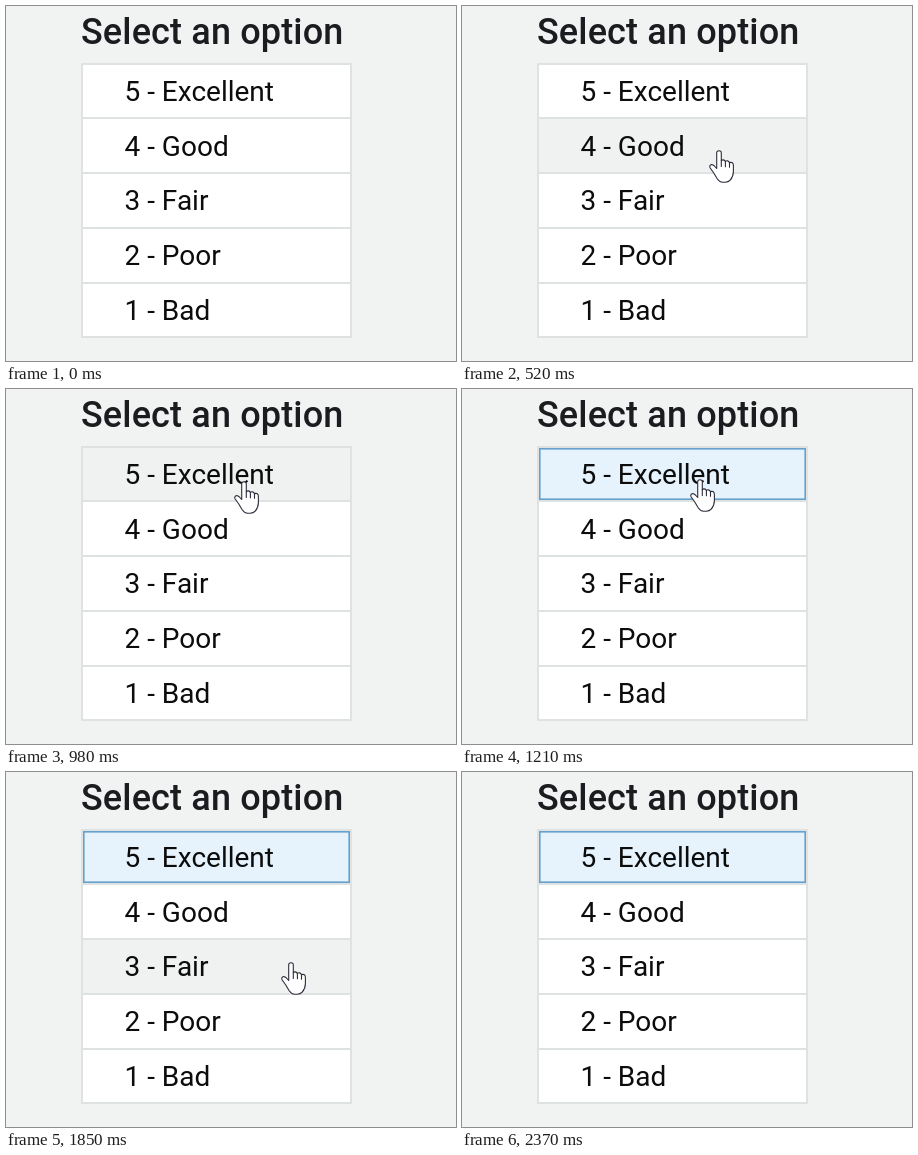
Animation, 450 px wide and 355 px high, one loop 2.99 s. Source, as an HTML page with a canvas:

```html
<!DOCTYPE html>
<html lang="en">
<head>
<meta charset="utf-8">
<title>Select an option</title>
<style>
  html, body { margin: 0; width: 100%; height: 100%; overflow: hidden; background: #f1f3f3; }
  canvas { display: block; }
</style>
</head>
<body>
<canvas id="stage" width="450" height="355"></canvas>
<script>
const ctx = document.getElementById('stage').getContext('2d');
const LOOP = 2990, SELECT_AT = 1210;
const LEFT = 76, RIGHT = 345, TOP = 57.7, PITCH = 54.75;
const options = ['5 - Excellent', '4 - Good', '3 - Fair', '2 - Poor', '1 - Bad'];

// Pointer moves, drawn in discrete steps; power shapes the ease-out
const moves = [
  { start: 210, end: 750, steps: 7, from: [335, 322], to: [241, 109], power: 2.1 },
  { start: 750, end: 1060, steps: 4, from: [241, 109], to: [238, 91], power: 1.5 },
  { start: 1610, end: 2370, steps: 10, from: [254, 111], to: [356, 378], power: 1 }
];

// Fingertip at the origin
const hand = new Path2D(
  'M-2.3 17.5V2Q-2.3 -.3 0 -.3Q2.3 -.3 2.3 2V9.6' +
  'Q4.5 7.8 6.4 10.4Q8.8 8.8 10.5 11.6Q14.3 10.6 14.4 14.4' +
  'V20.5Q14.4 25.5 11.2 29.2Q9.4 31.2 6.2 31.2H3.6' +
  'Q.4 31.2 -1.8 27.8L-5.4 21.8L-8.8 17' +
  'Q-10 14.8 -8 13.8Q-6.4 13.2 -4.6 15Z');
const creases = new Path2D('M2.3 9.6V15.5M6.4 10.4V15.8M10.5 11.6V16.2');

const edge = i => Math.round(TOP + i * PITCH);

function pointerAt(t) {
  const m = moves.findLast(m => m.start <= t);
  if (!m) return null;
  const step = Math.floor((t - m.start) / (m.end - m.start) * m.steps + .1);
  const k = 1 - (1 - Math.min(1, step / m.steps)) ** m.power;
  const [x, y] = m.from.map((a, i) => Math.round(a + (m.to[i] - a) * k));
  return { x, y };
}

function drawRow(i, hovered, selected) {
  const y = edge(i), w = RIGHT - LEFT, h = edge(i + 1) - y;
  ctx.fillStyle = selected ? '#e6f3fc' : hovered ? '#f0f1f1' : '#fff';
  ctx.fillRect(LEFT, y, w, h);
  ctx.lineWidth = 2;
  ctx.strokeStyle = '#dfe2e2';
  ctx.strokeRect(LEFT, y, w, h);
  if (selected) {
    ctx.lineWidth = 1.6;
    ctx.strokeStyle = '#64a1cd';
    ctx.strokeRect(LEFT + 1.8, y + 1.8, w - 3.6, h - 3.6);
  }
  drawText(options[i], 118.5, 94.9 + i * PITCH, '400 28px', '#0c0c0c');
}

function drawText(text, x, y, font, color, spacing = 0) {
  ctx.font = font + ' Roboto, sans-serif';
  ctx.fillStyle = color;
  ctx.letterSpacing = spacing + 'px';
  ctx.fillText(text, x, Math.round(y));
}

function drawHand({ x, y }) {
  ctx.save();
  ctx.translate(x, y);
  ctx.lineWidth = 1.1;
  ctx.lineJoin = ctx.lineCap = 'round';
  ctx.fillStyle = '#fff';
  ctx.strokeStyle = '#2c2c3c';
  ctx.fill(hand);
  ctx.stroke(hand);
  ctx.stroke(creases);
  ctx.restore();
}

function draw(now) {
  const t = now % LOOP;
  const pointer = pointerAt(t);
  const over = pointer ? Math.floor((pointer.y - TOP) / PITCH) : -1;
  ctx.fillStyle = '#f1f3f3';
  ctx.fillRect(0, 0, 450, 355);
  drawText('Select an option', 75, 38, '500 36px', '#1b1c20', .13);
  // Bottom up, so the selected first row lies on top
  for (let i = options.length - 1; i >= 0; i--) {
    drawRow(i, i === over, i === 0 && t >= SELECT_AT);
  }
  if (pointer) drawHand(pointer);
}

const start = performance.now();
function tick() {
  draw(performance.now() - start);
  requestAnimationFrame(tick);
}
tick();
</script>
</body>
</html>
```
